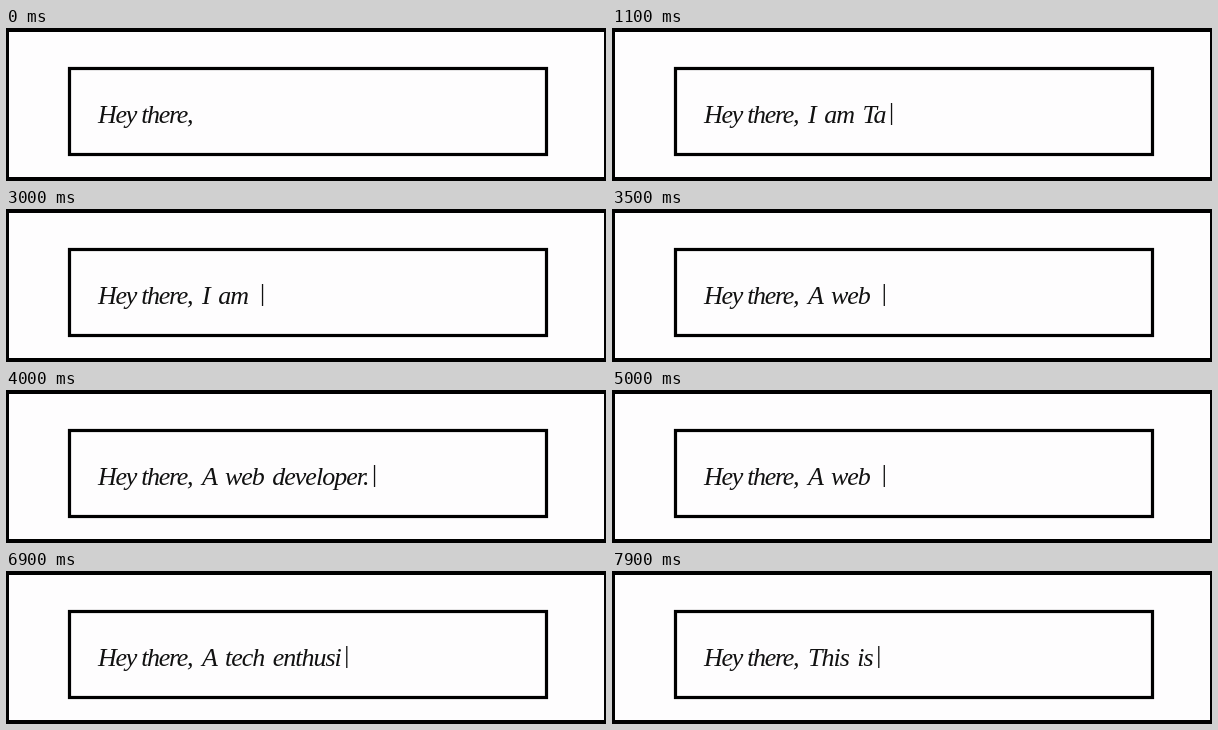
An HTML page for the animation above (8 s loop, 600 by 153 pixels).

```html
<!DOCTYPE html>
<html lang="en">
<head>
<meta charset="utf-8">
<title>Typed greeting</title>
<style>
  html, body { margin: 0; width: 100%; height: 100%; overflow: hidden; background: #000; }
  svg { display: block; }
  text {
    font: italic 26px "Liberation Serif", "Times New Roman", serif;
    letter-spacing: -1px;
    white-space: pre;
    fill: #111;
  }
  #typed { word-spacing: 3px; }
</style>
</head>
<body>
<svg width="600" height="153" viewBox="0 0 600 153">
  <rect x="3" y="4" width="595" height="145" fill="#fefdfe"/>
  <rect x="63.5" y="40.5" width="477" height="86" fill="none" stroke="#000" stroke-width="3.2"/>
  <text x="92" y="95" style="letter-spacing:-1.3px">Hey there,</text>
  <text x="196" y="95"><tspan id="typed"></tspan><tspan id="cursor" dx="2" dy="-3">|</tspan></text>
</svg>
<script>
  const LOOP = 8000, TICK = 100, KEY_MS = 50, BLINK_MS = 700;
  const NAME = "I am Tarunisha Kolvi.";
  const WEB = "A web developer.";
  const TECH = "A tech enthusiast.";
  const LAST = "This is";

  // start time, phrase, letters shown at the start and at the end
  const phases = [
    [-150, "", 0, 0],
    [750, NAME, 0, 21],
    [2180, NAME, 21, 0],
    [3220, WEB, 0, 16],
    [4480, WEB, 16, 2],
    [5350, TECH, 2, 18],
    [6680, TECH, 18, 0],
    [7580, LAST, 0, 7]
  ];

  const typed = document.getElementById("typed");
  const cursor = document.getElementById("cursor");

  function draw(t) {
    const [start, phrase, from, to] = phases.findLast(p => p[0] <= t);
    const end = start + Math.abs(to - from) * KEY_MS;
    const done = Math.min(1, (t - start) / (end - start || 1));
    typed.textContent = phrase.slice(0, Math.ceil(from + (to - from) * done));

    // The cursor is solid while keys move and pulses while a phrase rests.
    const resting = t >= end && to >= from;
    const pulse = 0.5 - 0.5 * Math.cos(2 * Math.PI * (t - end - 150) / BLINK_MS);
    cursor.setAttribute("fill-opacity", resting ? pulse : 1);
  }

  function frame() {
    const t = performance.now() % LOOP;
    draw(Math.floor(t / TICK) * TICK);
    requestAnimationFrame(frame);
  }
  frame();
</script>
</body>
</html>
```
